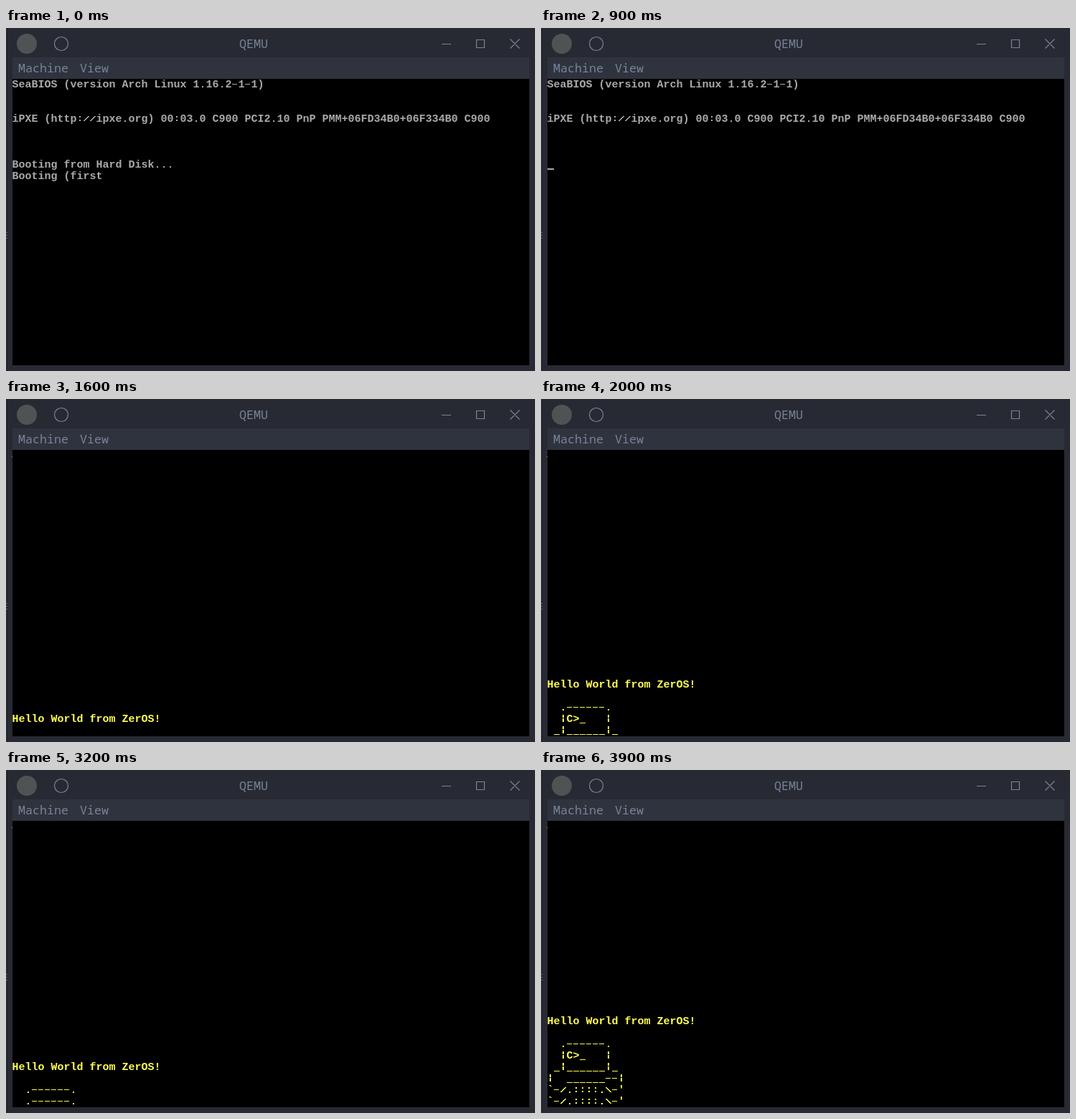
Write an HTML page with a canvas that moves like this. It is 737 px wide and 479 px high and loops after 4100 ms.

```html
<!DOCTYPE html>
<html lang="en">
<head>
<meta charset="utf-8">
<title>Boot loop</title>
<style>
  html, body { margin: 0; width: 100%; height: 100%; overflow: hidden; background: #282a33; }
  canvas { display: block; }
</style>
</head>
<body>
<canvas id="stage" width="737" height="479"></canvas>
<script>
const ctx = document.getElementById('stage').getContext('2d');
const CELL_W = 9, CELL_H = 16, LEFT = 9, TOP = 71, ROWS = 25;
const GREY = '#aaaaaa', YELLOW = '#ffff55';

const firmware = [
  'SeaBIOS (version Arch Linux 1.16.2-1-1)', '', '',
  'iPXE (http://ipxe.org) 00:03.0 C900 PCI2.10 PnP PMM+06FD34B0+06F334B0 C900',
  '', '', ''
];
const hello = ['Hello World from ZerOS!', ''];
const art = [
  '  .------.',
  '  |C>_   |',
  ' _|______|_',
  '|  ______--|',
  "`-/.::::.\\-'"
];

const bios = (lines, cursorRow) => ({ lines: firmware.concat(lines), row: 0, color: GREY, cursorRow });
// Kernel output sits on the last screen row; a scroll may leave its last line doubled.
const kernel = (count, doubled) => {
  const lines = hello.concat(art.slice(0, count));
  if (doubled) lines.push(lines[lines.length - 1]);
  return { lines, row: ROWS - lines.length, color: YELLOW };
};

const scenes = {
  C: bios([], 7),
  D: bios(['Booting from Hard Disk...'], 8),
  B: bios(['Booting from Hard Disk...', 'Booting (first']),
  H: kernel(0),
  S: kernel(1, true),
  A: kernel(3),
  U: kernel(4),
  F: kernel(5, true)
};
// One scene per 100 ms: the machine restarts about three times a second.
const schedule = 'BHADDADHACHACHACHACHACHACHAUBSSBSUDSUBSFF';

function rect(x, y, w, h, color) {
  if (color) ctx.fillStyle = color;
  ctx.fillRect(x, y, w, h);
}

// Pixel forms of the line-drawing characters, within one text cell.
const glyphs = {
  '-': (x, y) => rect(x, y + 7, 7, 1),
  '_': (x, y) => rect(x, y + 13, 8, 1),
  '.': (x, y) => rect(x + 3, y + 10, 2, 2),
  ':': (x, y) => { rect(x + 3, y + 4, 2, 2); rect(x + 3, y + 9, 2, 2); },
  '|': (x, y) => { rect(x + 3, y + 2, 2, 4); rect(x + 3, y + 7, 2, 5); },
  '/': (x, y) => { for (let i = 0; i < 7; i++) rect(x + 6 - i, y + 4 + i, 2, 1); },
  '\\': (x, y) => { for (let i = 0; i < 7; i++) rect(x + i, y + 4 + i, 2, 1); }
};

function drawLine(text, row, color) {
  const y = TOP + row * CELL_H;
  ctx.fillStyle = color;
  [...text].forEach((char, col) => {
    const x = LEFT + col * CELL_W;
    if (glyphs[char]) glyphs[char](x, y);
    else ctx.fillText(char, x - 0.5, y + 12);
  });
}

function drawScreen(scene) {
  rect(LEFT, TOP, 720, 400, '#000');
  ctx.font = 'bold 15px "Liberation Mono", monospace';
  scene.lines.forEach((line, i) => drawLine(line, scene.row + i, scene.color));
  if (scene.cursorRow) rect(LEFT, TOP + scene.cursorRow * CELL_H + 13, 9, 2, scene.color);
}

function drawWindow() {
  rect(0, 0, 737, 479, '#282a33');
  rect(0, 0, 1, 479, '#30343b');
  rect(1, 0, 1, 479, '#1d1f25');
  for (const y of [285, 289, 293]) rect(0, y, 2, 1, '#666a70');
  rect(LEFT, 41, 720, 30, '#2f333e');

  ctx.fillStyle = '#505354';
  ctx.beginPath();
  ctx.arc(29, 22, 14, 0, Math.PI * 2);
  ctx.fill();

  ctx.fillStyle = '#778397';
  ctx.font = '16.667px "Noto Sans Mono", monospace';
  ctx.fillText('QEMU', 325, 28);
  ctx.fillText('Machine', 17, 62);
  ctx.fillText('View', 103, 62);

  ctx.strokeStyle = '#7d838e';
  ctx.lineWidth = 1.2;
  ctx.beginPath();
  ctx.arc(77, 22, 9.5, 0, Math.PI * 2);
  ctx.moveTo(607, 22.5); ctx.lineTo(620, 22.5);
  ctx.rect(655.5, 16.5, 11, 11);
  ctx.moveTo(702.5, 15.5); ctx.lineTo(715.5, 28.5);
  ctx.moveTo(715.5, 15.5); ctx.lineTo(702.5, 28.5);
  ctx.stroke();
}

const start = performance.now();
function frame() {
  const step = Math.floor((performance.now() - start) / 100) % schedule.length;
  drawScreen(scenes[schedule[step]]);
  requestAnimationFrame(frame);
}
drawWindow();
frame();
</script>
</body>
</html>
```
